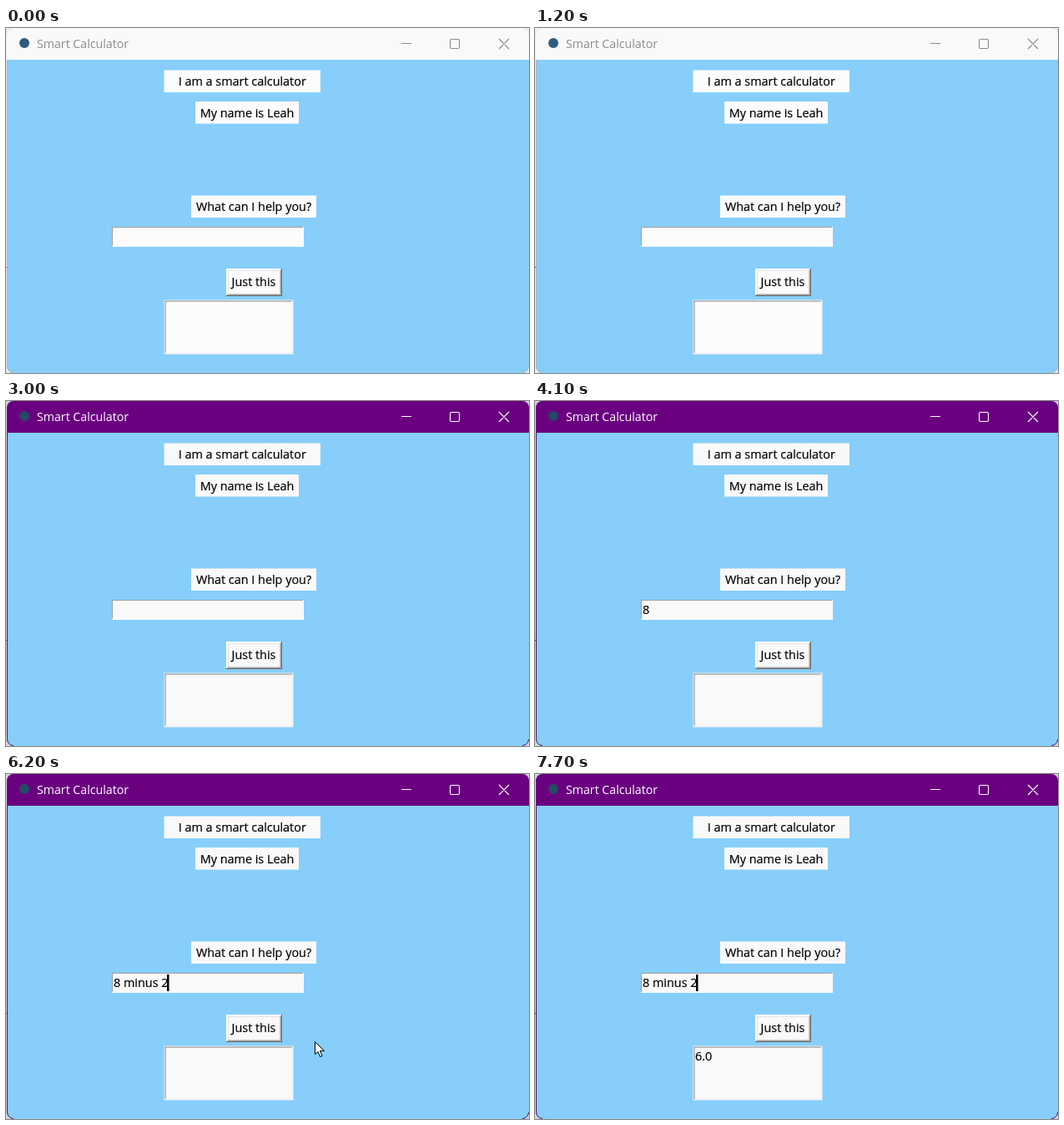
Recreate the animation shown at these times as an HTML page with a canvas. Size 627 px wide and 413 px high, loop 8 s.

```html
<!DOCTYPE html>
<html lang="en">
<head>
<meta charset="utf-8">
<title>Calculator</title>
<style>
  html, body { margin: 0; width: 100%; height: 100%; overflow: hidden; }
  canvas { display: block; width: 627px; height: 413px; }
</style>
</head>
<body>
<canvas id="stage" width="627" height="413"></canvas>
<script>
const ctx = document.getElementById('stage').getContext('2d');
const LOOP = 8000, STEP = 100, FOCUS = 1600, ANSWER = 7200;
const FAMILY = 'px "Open Sans", "Noto Sans", sans-serif';
const KEY_PACE = 50;
const BLINK = { first: 2080, period: 880, off: 280 };

const bursts = [
  { at: 3600, keys: '8' },
  { at: 4200, keys: ' ' },
  { at: 4500, keys: 'mi' },
  { at: 4900, keys: 'nus' },
  { at: 5300, keys: ' 2' }
];

// Each move is a quadratic curve, eased out by the given power.
const moves = [
  { start: 100, arrive: 900, end: 1100, ease: 1.4, from: [20, 0], via: [420, 380], to: [276, 262] },
  { start: 6200, arrive: 6400, end: 6500, ease: 1, from: [370, 320], via: [270, 333], to: [171, 346] },
  { start: 6600, arrive: 7400, end: 7400, ease: 1, from: [171, 346], via: [330, 290], to: [272, 262] }
];

function rect(x, y, w, h, color) {
  ctx.fillStyle = color;
  ctx.fillRect(x, y, w, h);
}

function bevel(x, y, w, h, light, dark) {
  rect(x, y, w, 1, light);
  rect(x, y, 1, h, light);
  rect(x, y + h - 1, w, 1, dark);
  rect(x + w - 1, y, 1, h, dark);
}

// A hairline outline gives widget text its hinted, darker look.
function widgetText(str, x, y, align = 'left') {
  ctx.font = 14.4 + FAMILY;
  ctx.textAlign = align;
  ctx.fillStyle = ctx.strokeStyle = '#000';
  ctx.lineWidth = 0.2;
  ctx.fillText(str, x, y);
  ctx.strokeText(str, x, y);
}

function label(str, center, y, w, paper) {
  rect(center - w / 2, y, w, 26.5, paper);
  widgetText(str, center, y + 18.5, 'center');
}

function titleBar(focused) {
  const ink = focused ? '#fff' : '#8b8b8b';
  rect(0, 0, 627, 38, focused ? '#6a0080' : '#f9f9f9');
  ctx.fillStyle = focused ? '#254a63' : '#315b7c';
  ctx.beginPath();
  ctx.arc(22, 18, 6, 0, Math.PI * 2);
  ctx.fill();

  ctx.font = 14.2 + FAMILY;
  ctx.textAlign = 'left';
  ctx.fillStyle = ctx.strokeStyle = ink;
  ctx.fillText('Smart Calculator', 37, 24);

  ctx.lineWidth = 1.1;
  ctx.beginPath();
  ctx.moveTo(474, 18.5);
  ctx.lineTo(486, 18.5);
  ctx.roundRect(532.5, 13.5, 11, 11, 1.5);
  ctx.moveTo(591, 13);
  ctx.lineTo(603, 25);
  ctx.moveTo(603, 13);
  ctx.lineTo(591, 25);
  ctx.stroke();
}

function windowFrame(focused) {
  rect(0, 0, 627, 413, focused ? '#d8d4dc' : '#f0eeee');
  rect(0, 286, 2, 1, '#a02040');
  ctx.save();
  ctx.beginPath();
  ctx.roundRect(1, 0, 626, 413, 8);
  ctx.clip();
  rect(1, 0, 626, 413, '#87cefa');
  titleBar(focused);
  ctx.restore();

  ctx.strokeStyle = focused ? '#4b1a60' : '#a9b4bd';
  ctx.lineWidth = 1;
  ctx.beginPath();
  ctx.moveTo(1.5, 38);
  ctx.arcTo(1.5, 412.5, 9, 412.5, 7.5);
  ctx.moveTo(619, 412.5);
  ctx.arcTo(626.5, 412.5, 626.5, 405, 7.5);
  ctx.stroke();
}

function button(paper, pressed) {
  const x = 264, y = 288, w = 67, h = 33, shift = pressed ? 1 : 0;
  const light = pressed ? '#696969' : '#fff';
  const dark = pressed ? '#fff' : '#696969';
  rect(x, y, w, h, paper);
  bevel(x, y, w, h, light, dark);
  bevel(x + 1, y + 1, w - 2, h - 2, light, pressed ? '#e3e3e3' : '#a0a0a0');
  bevel(x + 2, y + 2, w - 4, h - 4, '#e3e3e3', '#c8c8c8');
  widgetText('Just this', 297 + shift, 308.5 + shift, 'center');
}

function typedAt(t) {
  return bursts.map(({ at, keys }) =>
    t < at ? '' : keys.slice(0, 1 + Math.floor((t - at) / KEY_PACE))).join('');
}

function caretVisible(t) {
  if (t < FOCUS) return false;
  const phase = t - BLINK.first;
  return phase < 0 || phase % BLINK.period >= BLINK.off;
}

function entry(t, paper) {
  rect(127, 238, 230, 23.7, paper);
  bevel(127, 238, 230, 23.7, '#a0a0a0', '#fff');
  const value = typedAt(t);
  widgetText(value, 129, 255);
  if (caretVisible(t)) {
    rect(128 + Math.floor(ctx.measureText(value).width), 240, 2.5, 20, '#000');
  }
}

function results(t, paper) {
  rect(189.5, 325.5, 155, 65, paper);
  bevel(190.5, 326.5, 153, 63, '#858585', '#efefef');
  if (t >= ANSWER) widgetText('6.0', 192, 342.5);
}

function pointerAt(t) {
  const move = moves.find(m => t >= m.start && t < m.end);
  if (!move) return null;
  const p = Math.min(1, (t - move.start) / (move.arrive - move.start));
  const k = 1 - (1 - p) ** move.ease;
  return [0, 1].map(i => (1 - k) ** 2 * move.from[i]
    + 2 * k * (1 - k) * move.via[i] + k * k * move.to[i]);
}

function pointer([x, y]) {
  const inside = (l, top, r, b) => x > l && x < r && y > top && y < b;
  // The I-beam over text fields is not visible.
  if (inside(127, 238, 357, 261) || inside(190, 326, 344, 390)) return;
  ctx.save();
  ctx.translate(Math.round(x) + 0.5, Math.round(y) + 0.5);
  ctx.fillStyle = '#fff';
  ctx.strokeStyle = '#000';
  ctx.lineWidth = 1;
  const arrow = new Path2D('M0 0V15L3.5 12L6 18L8.5 17L6 11H11Z');
  ctx.fill(arrow);
  ctx.stroke(arrow);
  ctx.restore();
}

function draw(t) {
  const focused = t >= FOCUS;
  const paper = focused ? '#f9f9f9' : '#fcfcfc';
  windowFrame(focused);
  label('I am a smart calculator', 283.25, 50.5, 187.5, paper);
  label('My name is Leah', 289, 88, 124, paper);
  label('What can I help you?', 297, 200.5, 150, paper);
  entry(t, paper);
  button(paper, t >= ANSWER - 200 && t < ANSWER);
  results(t, paper);

  const spot = pointerAt(t);
  if (spot) pointer(spot);
}

const start = performance.now();
function frame() {
  const t = (performance.now() - start) % LOOP;
  draw(Math.floor(t / STEP) * STEP);
  requestAnimationFrame(frame);
}
frame();
</script>
</body>
</html>
```
